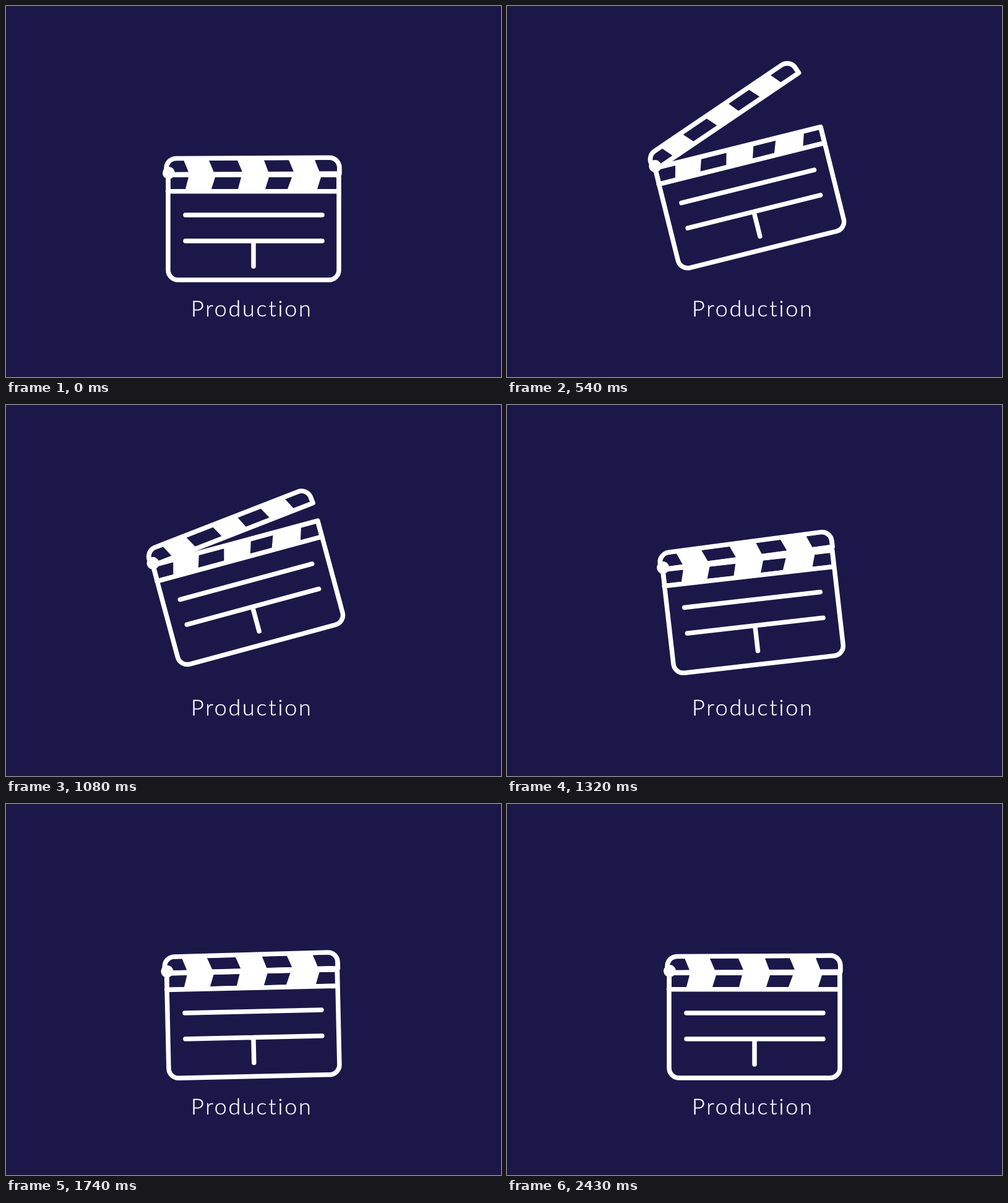
Write an HTML page that moves like this. It is 800x600 px and loops after 2460 ms.

```html
<!DOCTYPE html>
<html lang="en">
<head>
<meta charset="utf-8">
<title>Production</title>
<style>
  html, body { margin: 0; width: 100%; height: 100%; overflow: hidden; background: #1b1849; }
  svg { display: block; width: 100%; height: 100%; }
  text { font: 300 36px Lato, "Open Sans", sans-serif; letter-spacing: 2.75px;
    fill: #fff; stroke: #fff; stroke-width: .4; }
  .line { fill: none; stroke: #fff; stroke-width: 7.5; stroke-linecap: round; stroke-linejoin: round; }
  .fill { fill: #fff; }
</style>
</head>
<body>
<svg viewBox="0 0 800 600">
  <rect width="800" height="600" fill="#1b1849"/>
  <g id="board">
    <!-- striped strip, slate and writing lines -->
    <path class="fill" fill-rule="evenodd" d="M262 273H538V300H262Z
      M266 277H295L290 296H266Z M338 277H380L375 296H332Z
      M425 277H462L455 296H419Z M509 277H534V296H503Z"/>
    <path class="line" d="M262 273H538V427A16 16 0 0 1 522 443H278A16 16 0 0 1 262 427Z
      M261.5 299.8H538"/>
    <path class="line" d="M290 338H511M290 380H511M400 380V421"/>
    <g id="arm">
      <path class="fill" fill-rule="evenodd" d="M262 272.5H539V262.5A16 16 0 0 0 523 246.5H275A16 16 0 0 0 259 262.5Z
        M287.5 250H275A12 12 0 0 0 263 262V269H295Z M328 250H374L382 269H336Z
        M417 250H457L465 269H424Z M499 250H523A12 12 0 0 1 535 262V269H506.5Z"/>
      <path class="line" d="M262 272.5H539V262.5A16 16 0 0 0 523 246.5H275A16 16 0 0 0 259 262.5Z"/>
    </g>
    <circle class="fill" cx="263" cy="270" r="10"/>
  </g>
  <text x="299" y="502">Production</text>
</svg>
<script>
  const LOOP = 2460, STEP = 30;
  const board = document.getElementById("board");
  const arm = document.getElementById("arm");

  // Smooth 0 to 1 between two times
  function ease(t, from, to) {
    const u = Math.min(1, Math.max(0, (t - from) / (to - from)));
    return u * u * (3 - 2 * u);
  }

  // Small hops after landing, each half as high as the last
  function hop(t) {
    const s = Math.max(0, t - 1500) / 450;
    return 1.9 * Math.sin(Math.PI * s) ** 2 * 2 ** -s;
  }

  function draw(t) {
    const fall = ease(t, 1080, 1520);
    const turn = ease(t, 90, 630) - fall;
    const rise = ease(t, 115, 655) - fall;
    const open = ease(t, 60, 495) - ease(t, 433, 1436);

    const x = 1.5 * Math.sin(Math.PI * turn);
    const y = -53.8 * rise - 1.9 * hop(t);
    const tilt = -15.1 * turn - hop(t);
    board.setAttribute("transform", `translate(${x} ${y}) rotate(${tilt} 400 386)`);
    arm.setAttribute("transform", `rotate(${-0.3 - 20.5 * open} 270.5 266)`);
  }

  const start = performance.now();
  function tick() {
    const t = (performance.now() - start) % LOOP;
    draw(Math.floor(t / STEP) * STEP);
    requestAnimationFrame(tick);
  }
  draw(0);
  requestAnimationFrame(tick);
</script>
</body>
</html>
```
